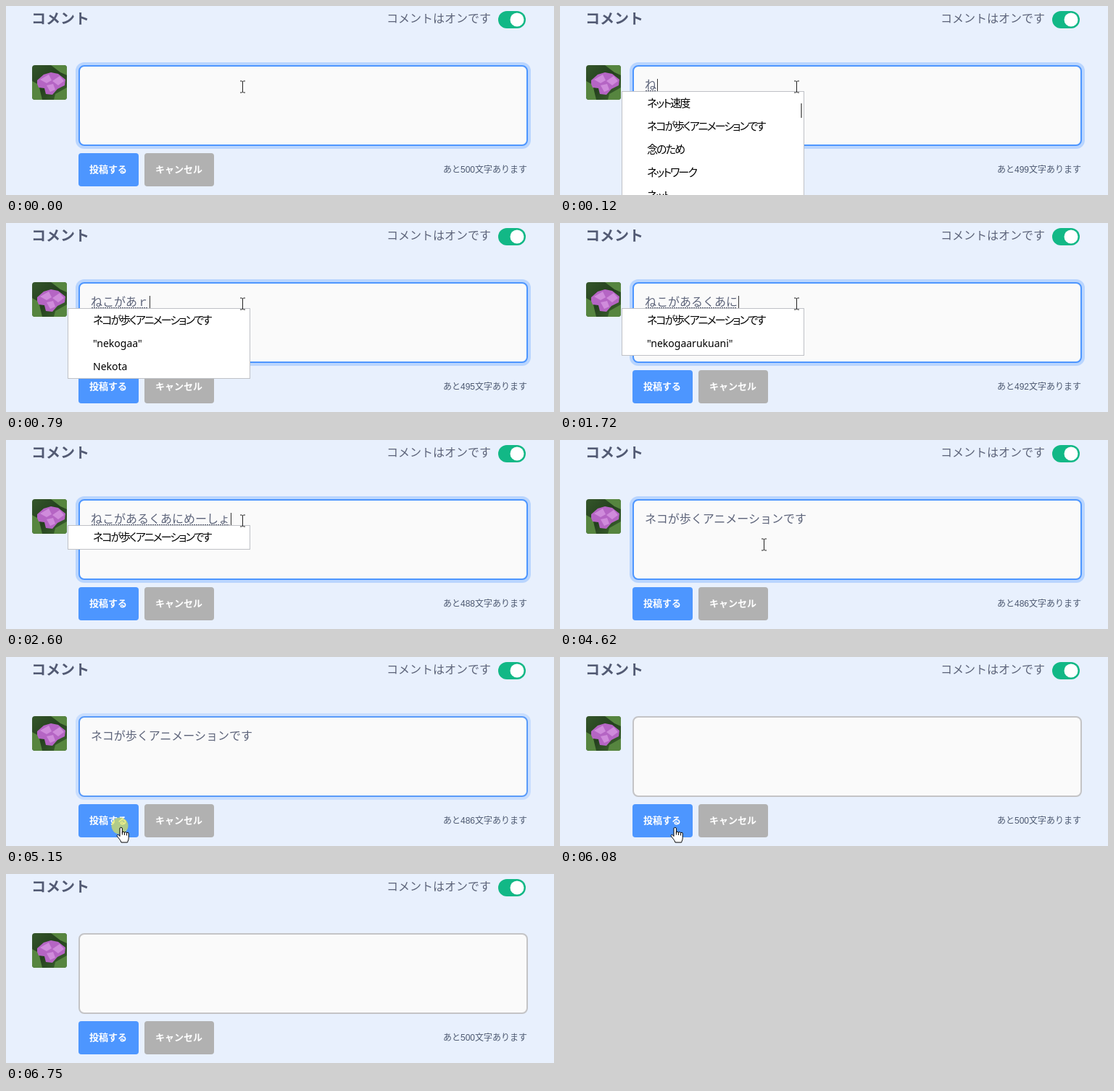
These frames come from a looping animation (756x262 px, 7810 ms). An HTML page:

```html
<!DOCTYPE html>
<html lang="ja">
<meta charset="utf-8">
<title>コメント</title>
<style>
html, body { margin: 0; height: 100%; overflow: hidden; background: #e8f0fd }
svg { display: block; width: 756px; height: 262px }
text { font: 16px "Liberation Sans", "Noto Sans CJK JP", "Noto Sans CJK", sans-serif; fill: #5d647a; white-space: pre }
text.head { font-size: 20px; font-weight: 700; fill: #525a73 }
text.btn { font-size: 13px; font-weight: 700; fill: #fff }
text.count { font-size: 12px; fill: #4c5870 }
text.item { font: 14px "Noto Sans", "Noto Sans CJK JP", "Noto Sans CJK", sans-serif; fill: #000 }
text.kana { font-size: 15px; font-feature-settings: "palt"; letter-spacing: -1.9px }
</style>
<svg viewBox="0 0 756 262">
  <defs>
    <clipPath id="round"><rect x="36" y="82" width="48" height="48" rx="4"/></clipPath>
    <linearGradient id="leaf" x2="1" y2="1"><stop stop-color="#34562a"/><stop offset=".5" stop-color="#24401e"/><stop offset="1" stop-color="#3f6a30"/></linearGradient>
  </defs>
  <text class="head" x="35" y="25">コメント</text>
  <text x="525" y="23">コメントはオンです</text>
  <rect x="679" y="7" width="38" height="24" rx="12" fill="#12b886"/>
  <circle cx="705" cy="19" r="9.5" fill="#fff"/>

  <g clip-path="url(#round)">
    <rect x="36" y="82" width="48" height="48" fill="url(#leaf)"/>
    <path d="M36 104l9 5 5 21H36zM62 82h22v14l-9-4zM68 122l16-9v17H66z" fill="#56853f"/>
    <path d="M43 103l9-8 10-3 10 2 10 8-1 8-10 5-7 8-9-1-2-8-8-1-2-5z" fill="#b565c4"/>
    <path d="M47 102l12-7 4 8-7 4zM64 104l10-7 6 7-8 6zM56 110l9-2 3 8-7 3z" fill="#cf8bdb"/>
  </g>

  <rect id="ring" x="96" y="78" width="628" height="120" rx="12" fill="#4d96ff"/>
  <rect id="edge" x="101" y="83" width="618" height="110" rx="7" fill="#fafafa" stroke-width="2"/>
  <text id="typed" x="117" y="115"></text>
  <path id="line" fill="none" stroke="#4c5266"/>
  <rect id="caret" y="101" width="1" height="17" fill="#333"/>

  <rect x="100" y="204" width="83" height="46" rx="4" fill="#4d96ff"/>
  <text class="btn" x="115" y="231">投稿する</text>
  <rect x="191" y="204" width="96" height="46" rx="4" fill="#b1b1b1"/>
  <text class="btn" x="206" y="231">キャンセル</text>
  <text id="count" class="count" x="719" y="231" text-anchor="end"></text>
  <g id="popup"></g>
  <circle id="halo" cx="157" cy="234" r="11.5" fill="#e6e84a" opacity=".65"/>
  <g id="mouse">
    <path d="M-3.5 -7.5h2.5l1 1 1-1h2.500M0 -6.500v14M-3.500 8.500h2.500l1-1 1 1h2.500" fill="none" stroke="#222"/>
    <path d="M0 0v16l4-4 2.500 6 2.500-1-2.500-6h5.500z" fill="#fff" stroke="#000"/>
    <g transform="translate(-6)" fill="#fff" stroke="#000">
      <path d="M4.500 13V2.500a1.700 1.700 0 0 1 3.400 0V8a1.500 1.500 0 0 1 3 .3 1.500 1.500 0 0 1 3 .6 1.400 1.400 0 0 1 2.800 .6V15c0 3-1 4-1.600 6.500H6.500C5.500 18 2.500 15.500 .8 12.800c-.8-1.500 1-2.600 2.200-1.500z"/>
      <path d="M7.900 7v4M10.900 8v3.500M13.900 9v3"/>
    </g>
  </g>
</svg>
<script>
const LOOP = 7810, $ = id => document.getElementById(id);
const phrase = 'ネコが歩くアニメーションです';
const romaji = s => [phrase, `"${s}"`];

// [time, text, suggestions]; suggestions stay until replaced
const typing = [
  [0, '', []],
  [60, 'ｎ'],
  [120, 'ね', ['ネット速度', phrase, '念のため', 'ネットワーク', 'ネット']],
  [260, 'ねｋ'],
  [330, 'ねこ', [phrase, '猫', 'ネコ', 'Nekota', '"neko"']],
  [400, 'ねこｇ'],
  [460, 'ねこが', [phrase, '猫が', 'ネコが', 'Nekota', '"nekoga"']],
  [660, 'ねこがあ', [...romaji('nekogaa'), 'Nekota']],
  [790, 'ねこがあｒ'],
  [1000, 'ねこがある', romaji('nekogaaru')],
  [1190, 'ねこがあるく', romaji('nekogaaruku')],
  [1390, 'ねこがあるくあ', romaji('nekogaarukua')],
  [1590, 'ねこがあるくあｎ'],
  [1720, 'ねこがあるくあに', romaji('nekogaarukuani')],
  [1850, 'ねこがあるくあにｍ'],
  [1920, 'ねこがあるくあにめ', romaji('nekogaarukuanime')],
  [2060, 'ねこがあるくあにめー'],
  [2260, 'ねこがあるくあにめーｓ', [phrase]],
  [2390, 'ねこがあるくあにめーｓｙ'],
  [2530, 'ねこがあるくあにめーしょ'],
  [2730, 'ねこがあるくあにめーしょｎ'],
  [2870, 'ねこがあるくあにめーしょん'],
  [2930, 'ねこがあるくあにめーしょんｄ'],
  [3080, 'ねこがあるくあにめーしょんで'],
  [3150, 'ねこがあるくあにめーしょんでｓ'],
  [3220, 'ねこがあるくあにめーしょんです'],
  [3420, phrase, []],
  [6080, '']
];
const approach = [4620, 4690, 4750, 4820, 4890, 4950, 5020, 5150, 5210, 5350];
const leave = [6540, 6610, 6680];
const passed = (times, t) => times.filter(s => s <= t).length;
const show = (el, on) => el.style.display = on ? '' : 'none';
const mix = (a, b, k) => a + (b - a) * k;

function drawPopup(items) {
  const h = Math.min(items.length * 32 + 2, 160);
  let out = items.length ? `<rect x="85.5" y="118.5" width="251" height="${h - 1}" fill="#fff" stroke="#bfc1c6"/>` : '';
  items.forEach((s, i) => {
    const kana = /[^\x00-\x7f]/.test(s) ? ' kana' : '';
    out += `<text class="item${kana}" x="120" y="${140 + i * 32}">${s}</text>`;
  });
  if (items.length > 4) out += '<rect x="332" y="135" width="2" height="20" fill="#858585"/>';
  $('popup').innerHTML = out;
}

function drawMouse(t) {
  const k = 1 - (1 - Math.min(passed(approach, t) / 7, 1)) ** 2;
  let x = mix(326, 158, k), y = mix(111, 235, k);
  const out = passed(leave, t);
  if (out) { x = mix(158, 530, out / 3); y = mix(235, 250, out / 3); }
  const kind = out > 1 ? 1 : y < 194 ? 0 : y < 204 ? 1 : 2;
  const mouse = $('mouse');
  mouse.setAttribute('transform', `translate(${Math.round(x) + .5} ${Math.round(y) + .5})`);
  [...mouse.children].forEach((el, i) => show(el, i == kind));
  show(mouse, t < 6750);
}

let last = '';
function draw(t) {
  const done = typing.filter(e => e[0] <= t);
  const text = done.at(-1)[1], items = done.findLast(e => e[2])[2];
  const end = 117 + text.length * 16;
  $('typed').textContent = text;
  $('count').textContent = `あと${500 - text.length}文字あります`;
  if (items.join() != last) drawPopup(items);
  last = items.join();

  const line = $('line'), fixed = t >= 3420;
  line.setAttribute('d', fixed ? 'M118 117H164M166 117H196M198 117H341' : `M118 117.5H${end - 1}`);
  line.setAttribute('stroke-dasharray', fixed ? 'none' : '2 1');
  show(line, text && t < 3820);
  $('caret').setAttribute('x', end + 1);
  show($('caret'), t >= 60 && t < 4350 || t >= 4890 && t < 5150);

  const blur = Math.max(0, passed(approach, t) - 7) / 3;
  $('ring').style.opacity = .3 * (1 - blur);
  $('edge').style.stroke = `rgb(${mix(77, 196, blur ** 2)} ${mix(150, 196, blur ** 2)} ${mix(255, 198, blur ** 2)})`;
  show($('halo'), t >= 5150 && t < 5350);
  drawMouse(t);
}

const start = performance.now();
(function tick() {
  draw((performance.now() - start) % LOOP);
  requestAnimationFrame(tick);
})();
</script>
</html>
```
